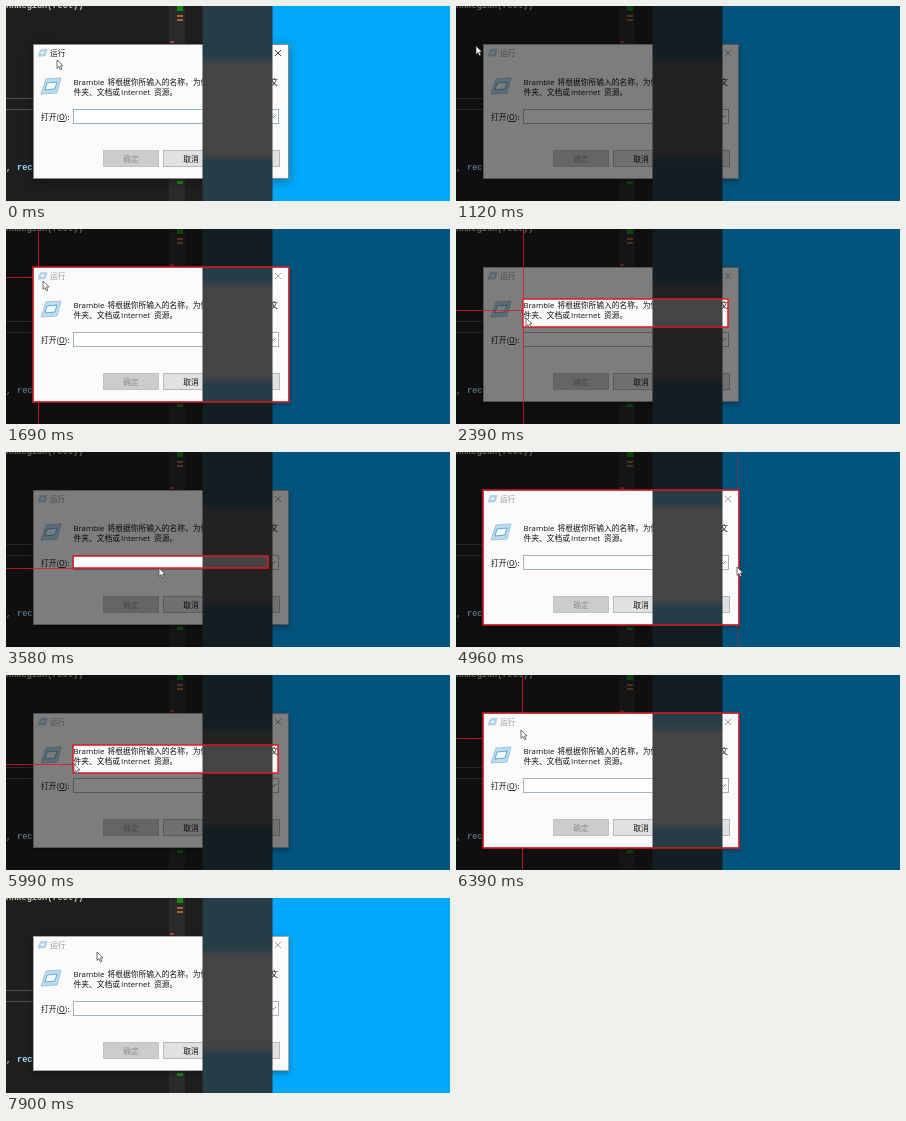
Write an HTML page with a canvas that moves like this. It is 444 px wide and 195 px high and loops after 7.99 s.

```html
<!DOCTYPE html>
<html lang="zh-CN">
<head>
<meta charset="utf-8">
<style>
html, body { margin: 0; width: 444px; height: 195px; overflow: hidden; background: #1e1e1e; }
canvas { display: block; }
</style>
</head>
<body>
<canvas id="stage" width="444" height="195"></canvas>
<script>
const W = 444, H = 195, LOOP = 7990, LAG = 80;
const c = document.getElementById('stage').getContext('2d');
const UI = '"Noto Sans CJK SC", "Noto Sans CJK", sans-serif';
const LATIN = '"Open Sans", sans-serif';
const MONO = 'bold 8.6px "Liberation Mono", monospace';
const RED = '#dc1a22';

// Regions as [x, y, width, height]; the innermost one comes first.
const dialog = [27, 38, 256, 135];
const buttonAt = x => [x, 144, 56, 17];
const regions = [[67, 70, 205, 28], [67, 104, 195, 12], buttonAt(97), buttonAt(157), dialog];

// Pointer moves: start, end, target x, target y. It rests in between.
const home = [51, 54];
const moves = [
  [100, 400, 16, 104], [820, 960, 20, 40], [1410, 2120, 64, 70],
  [2210, 2390, 70, 89], [2390, 2950, 140, 126], [3030, 3390, 153, 116],
  [3580, 4310, 236, 111], [4390, 4880, 281, 115], [5230, 5910, 68, 89],
  [6070, 6390, 65, 55], [7600, 7900, 91, 54]
];

function pointer(t) {
  let [x, y] = home;
  for (const [start, end, tx, ty] of moves) {
    const k = Math.min(1, Math.max(0, (t - start) / (end - start)));
    x += (tx - x) * k;
    y += (ty - y) * k;
  }
  return [Math.round(x), Math.round(y)];
}

function box(x, y, w, h, fill) {
  c.fillStyle = fill;
  c.fillRect(x, y, w, h);
}

function frame(x, y, w, h, color) {
  c.strokeStyle = color;
  c.lineWidth = 1;
  c.strokeRect(x + .5, y + .5, w - 1, h - 1);
}

function text(s, x, y, color, font = `7.75px ${UI}`, align = 'left') {
  c.font = font;
  c.textAlign = align;
  c.fillStyle = color;
  c.fillText(s, x, y);
}

function line(points, color, width = .9) {
  c.strokeStyle = color;
  c.lineWidth = width;
  c.beginPath();
  points.forEach(p => c.lineTo(...p));
  c.stroke();
}

function shape(points, fill, stroke) {
  c.beginPath();
  points.forEach(p => c.lineTo(...p));
  c.closePath();
  c.fillStyle = fill;
  c.fill();
  c.strokeStyle = stroke;
  c.stroke();
}

function editor() {
  box(0, 0, 197, H, '#1e1e1e');
  box(163, 0, 16, H, '#2b2b2b');
  box(171, 0, 6, 5, '#138a13');
  for (const y of [9, 13]) box(171, y, 6, 2, '#a5632d');
  box(164, 35, 4, 2, '#c03a3a');
  box(171, 175, 6, 3, '#138a13');
  text('nnRegion(rect))', 0, 2, '#c8c8b0', MONO);
  for (const y of [92, 103]) box(0, y, 27, 1, '#505050');
  text(',', 0, 164, '#c8c8c8', MONO);
  text('rect', 11, 164, '#9cdcfe', MONO);
}

function runIcon(x, y, s) {
  c.save();
  c.translate(x, y);
  c.scale(s, s);
  c.lineWidth = .8;
  shape([[5, 1], [20, 0], [16, 15], [0, 16]], '#bcdcf0', '#92b8d2');
  shape([[6, 5], [16, 4], [14, 11], [4, 12]], '#f4fafd', '#459acf');
  c.restore();
}

function button(x, name, fill, border, color) {
  box(...buttonAt(x), fill);
  frame(...buttonAt(x), border);
  text(name, x + 28, 155.5, color, undefined, 'center');
}

function runDialog(active) {
  c.save();
  c.shadowColor = 'rgba(0,0,0,.35)';
  c.shadowBlur = active ? 10 : 5;
  c.shadowOffsetY = 2;
  box(...dialog, '#fbfbfb');
  c.restore();
  frame(...dialog, active ? '#888' : '#aaa');

  const titleColor = active ? '#222' : '#999';
  runIcon(32, 43, .46);
  text('运行', 44, 50, titleColor);
  line([[269, 44], [275, 50]], titleColor);
  line([[275, 44], [269, 50]], titleColor);

  const ink = '#111', latin = `7.8px ${LATIN}`;
  runIcon(35, 72, 1);
  text('Bramble', 67.5, 79, ink, latin);
  text('将根据你所输入的名称，为你打开相应的程序、文', 101.5, 79, ink);
  text('件夹、文档或', 67.5, 89, ink);
  text('Internet', 115, 89, ink, latin);
  text('资源。', 148, 89, ink);
  text('打开(O):', 35, 114, ink);
  box(53, 115, 6, 1, '#333');

  box(67, 103, 206, 15, '#fff');
  frame(67, 103, 206, 15, active ? '#86b4d6' : '#a3b4be');
  line([[265, 109], [267.5, 111.5], [270, 109]], '#777');

  button(97, '确定', '#ccc', '#c2c2c2', '#8f8f8f');
  button(157, '取消', '#e1e1e1', '#b8b8b8', ink);
  button(218, '浏览', '#e1e1e1', '#b8b8b8', ink);
}

// Translucent strip; the dialog behind it shows as a soft grey area.
function darkStrip() {
  const g = c.createLinearGradient(0, 50, 0, 156);
  const teal = '#263c47', grey = '#444';
  [teal, grey, grey, teal].forEach((color, i) => g.addColorStop([0, .08, .92, 1][i], color));
  box(196.5, 0, 70, H, g);
}

function dim(hole) {
  c.beginPath();
  c.rect(0, 0, W, H);
  if (hole) c.rect(...hole);
  c.fillStyle = 'rgba(0,0,0,.5)';
  c.fill('evenodd');
}

// Guides trail the pointer and stay outside the bright region.
function guides(t, x, y, hole) {
  const [gx, gy] = pointer(t - LAG);
  const left = gx < W / 2;
  const moving = gx !== x || gy !== y;
  c.save();
  c.beginPath();
  c.rect(0, 0, W, H);
  c.rect(...hole);
  c.clip('evenodd');
  c.globalAlpha = left ? .8 : .4;
  if (left) box(0, gy, gx, 1, RED);
  if (moving || !left) box(gx, 0, 1, H, RED);
  c.restore();
}

function overlay(t, x, y) {
  const hit = regions.find(([l, top, w, h]) =>
    x >= l && x <= l + w && y >= top && y <= top + h);
  dim(hit);
  if (!hit) return;
  guides(t, x, y, hit);
  c.strokeStyle = RED;
  c.lineWidth = 1.5;
  c.strokeRect(...hit);
}

function arrow(x, y) {
  c.save();
  c.translate(x, y);
  c.lineWidth = .7;
  shape([[0, 0], [0, 8.4], [2, 6.6], [3.4, 9.8], [4.9, 9.1], [3.5, 6], [6, 5.8]],
    '#fff', '#333');
  c.restore();
}

function draw(now) {
  const t = now % LOOP;
  const [x, y] = pointer(t);
  editor();
  box(197, 0, W - 197, H, '#00a9fb');
  runDialog(t < 820);
  darkStrip();
  if (t >= 1120 && t < 7400) overlay(t, x, y);
  arrow(x, y);
  requestAnimationFrame(draw);
}

requestAnimationFrame(draw);
</script>
</body>
</html>
```
